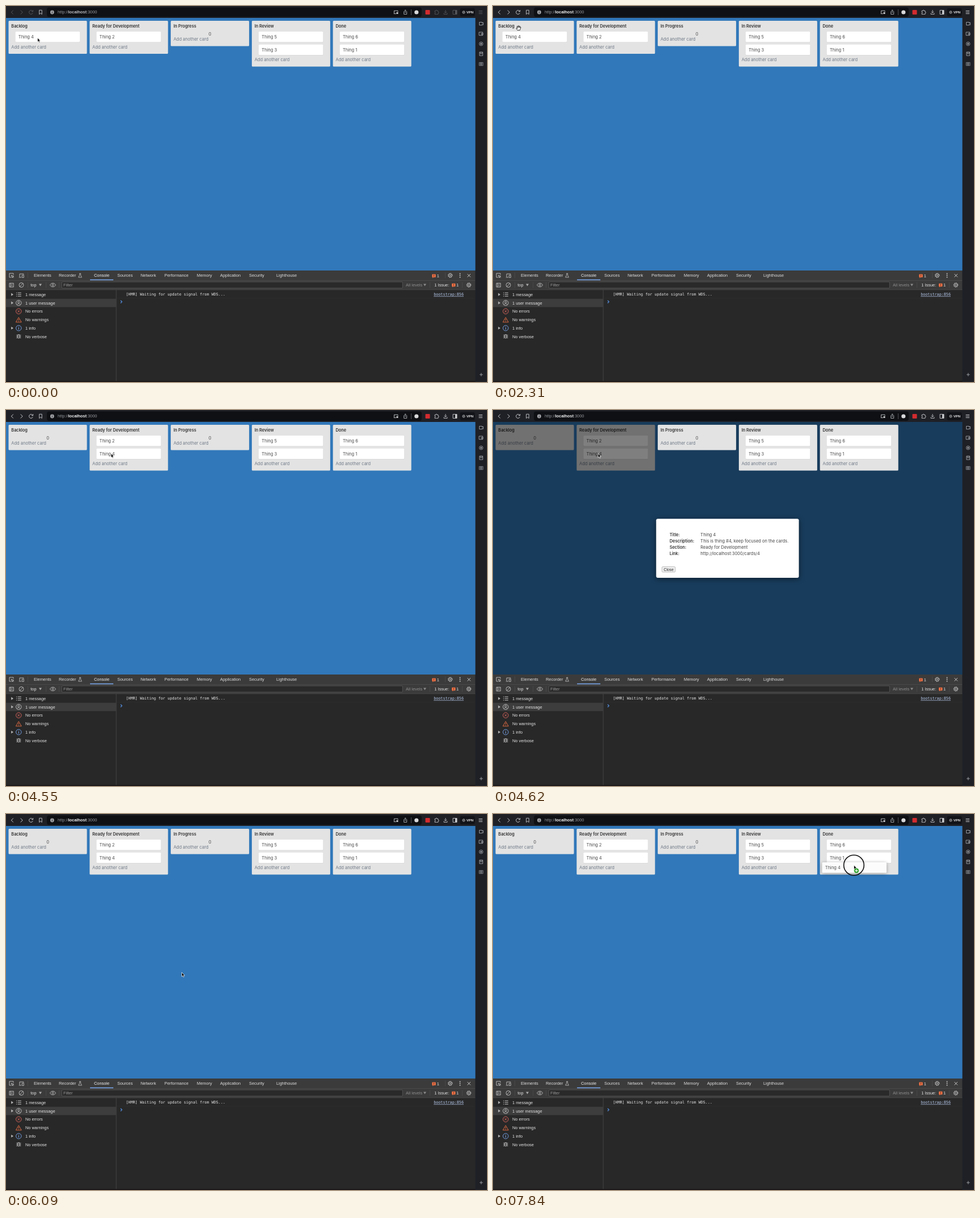
Recreate the animation shown at these times as an HTML page. Size 847 px wide and 661 px high, loop 8 s.

```html
<!DOCTYPE html>
<html lang="en">
<head>
<meta charset="utf-8">
<title>Card board</title>
<style>
html, body { margin: 0; width: 100%; height: 100%; overflow: hidden; background: #282828; }
svg { display: block; width: 847px; height: 661px; }
.ui { font: 7.4px "Liberation Sans", Arial, sans-serif; }
.tiny { font: bold 6px "Liberation Sans", Arial, sans-serif; }
.body { font: 7.5px Inter, sans-serif; }
.head { font: 600 7.35px Inter, sans-serif; }
.mono { font: 6.76px "DejaVu Sans Mono", monospace; }
.lift { filter: drop-shadow(0 1px 3px rgba(0,0,0,.35)); }
.pop { filter: drop-shadow(0 2px 5px rgba(0,0,0,.5)); }
</style>
</head>
<body>
<svg id="stage" viewBox="0 0 847 661"></svg>
<script>
const stage = document.getElementById('stage');
const LOOP = 8000, STEP = 70;

const text = (x, y, s, cls = 'ui', fill = '#e4e4e4', extra = '') =>
  `<text x="${x}" y="${y}" class="${cls}" fill="${fill}" ${extra}>${s}</text>`;
const rect = (x, y, w, h, fill, r = 0, extra = '') =>
  `<rect x="${x}" y="${y}" width="${w}" height="${h}" rx="${r}" fill="${fill}" ${extra}/>`;
const path = (d, stroke = '#c4c4c4', w = 1, fill = 'none') =>
  `<path d="${d}" stroke="${stroke}" stroke-width="${w}" fill="${fill}" stroke-linejoin="round"/>`;
const ring = (x, y, r, stroke, w = 1, fill = 'none') =>
  `<circle cx="${x}" cy="${y}" r="${r}" stroke="${stroke}" stroke-width="${w}" fill="${fill}"/>`;
const dot = (x, y, r, fill) => ring(x, y, r, 'none', 0, fill);
const at = (x, y, s) => `<g transform="translate(${x} ${y})">${s}</g>`;

// Pointer path: time, x, y
const track = [
  [0, 55.5, 56], [140, 49, 55], [280, 49, 55], [420, 37.5, 57], [490, 37.5, 57],
  [560, 54.5, 45], [770, 54.5, 45], [1120, 56, 30], [1400, 50, 16], [1470, 50, 16],
  [1610, 45, 12], [2170, 45, 12], [2310, 44.5, 38], [2660, 36, 56], [2800, 36, 56],
  [2940, 100, 52], [3080, 165, 63], [3220, 175, 68], [3570, 183.5, 73.5],
  [3990, 183.5, 73.5], [4060, 185, 74], [4130, 185, 74], [4340, 185, 76.5],
  [5040, 185, 76.5], [5390, 335, 303], [5460, 335, 303], [5880, 309.5, 278.5],
  [6160, 309.5, 278.5], [6650, 215.5, 73], [6860, 215.5, 73], [7000, 258, 75],
  [7420, 490, 83], [7840, 635.5, 90], [LOOP, 635.5, 90]
];

function pointer(t) {
  const i = track.findIndex(k => k[0] > t);
  const a = track[i - 1], b = track[i];
  const p = (t - a[0]) / (b[0] - a[0]);
  return [a[1] + (b[1] - a[1]) * p, a[2] + (b[2] - a[2]) * p];
}

const during = (t, ...spans) => spans.some(([a, b]) => t >= a && t < b);

const card = (x, y, name) =>
  rect(x, y + .6, 113.5, 18.5, '#c9c9c9', 1.5) + rect(x, y, 113.5, 18.5, '#fff', 1.5) +
  text(x + 5.3, y + 12, name, 'body', '#4a4a4a');

function column(i, title, cards, hover) {
  const x = 4.5 + 142.8 * i, n = cards.length;
  const addY = n ? 52 + 22.7 * n : 61;
  return rect(x, 26, 138, n ? 35.4 + 22.6 * n : 44.5, '#e3e3e3', 1.5) +
    text(x + 4.8, 38.3, title, 'head', '#333') +
    cards.map((c, k) => card(x + 12, 45 + 22.7 * k, 'Thing ' + c)).join('') +
    (n ? '' : text(x + 69, 52, '0', 'body', '#4a4a4a', 'text-anchor="middle"')) +
    text(x + 4.8, addY, 'Add another card', 'body', hover ? '#4d4d4d' : '#6f7a87',
      hover ? 'text-decoration="underline"' : '');
}

function modal() {
  const rows = [
    ['Title:', 'Thing 4'],
    ['Description:', 'This is thing #4, keep focused on the cards.'],
    ['Section:', 'Ready for Development'],
    ['Link:', 'http://localhost:3000/cards/4']
  ];
  return rect(287.3, 191.3, 251.3, 103.7, '#fff', 3, 'class="pop"') +
    rows.map(([k, v], i) => text(311, 221.9 + 11 * i, k, 'head', '#333') +
      text(365.3, 221.9 + 11 * i, v, 'body', '#444')).join('') +
    rect(297.5, 275.5, 23.5, 9.5, '#efefef', 1.5, 'stroke="#999" stroke-width=".6"') +
    text(309.3, 282.5, 'Close', 'ui', '#222', 'text-anchor="middle" style="font-size:6.8px"');
}

function board(t) {
  const moved = t >= 3780, open = during(t, [4620, 6090]);
  return rect(0, 21, 827, 444, '#3178ba') +
    column(0, 'Backlog', moved ? [] : [4]) +
    column(1, 'Ready for Development', moved ? [2, 4] : [2], during(t, [3430, 3920])) +
    (open ? rect(0, 21, 827, 444, 'rgba(0,0,0,.5)') : '') +
    column(2, 'In Progress', []) + column(3, 'In Review', [5, 3]) + column(4, 'Done', [6, 1]) +
    (open ? modal() : '');
}

function toolbar(t) {
  const focus = t >= 350, ink = focus ? '#c9cacd' : '#55575c', grey = '#95979c';
  const loading = during(t, [1820, 2100]);
  return rect(0, 0, 847, 21, '#1e2026') + rect(72, 2.5, 660, 16.5, '#0e1014', 4) +
    (during(t, [1540, 1890]) ? dot(44.5, 11, 9, '#34363c') : '') +
    path('M12.8 7.5L9.3 11L12.8 14.5M25.7 7.5L29.2 11L25.7 14.5', ink) +
    path(loading ? 'M41 7.7L47.5 14.2M47.5 7.7L41 14.2' : 'M47.2 12.2A3.4 3.4 0 1 1 46.6 8.8M47.6 7.2V9.7H45', ink) +
    path('M58.6 7.3H63.2V14.6L60.9 12.6L58.6 14.6Z', '#b5b7bb') +
    dot(81.3, 11, 3.4, '#a0a2a6') + path('M81.3 10.5V13M81.3 8.7V9.6', '#17191d', .9) +
    text(91, 13.4, `http://<tspan fill="${focus ? '#f2f2f2' : '#bcbec2'}" font-weight="bold">localhost</tspan>:3000`, 'ui', grey) +
    path('M683.5 13V8.3H690V10.5M682.8 13.6H687', '#c5c7ca', .9) +
    rect(687.5, 11, 3, 3, '#c5c7ca') +
    path('M701.7 9.8H700.7V14.5H705.7V9.8H704.7M703.2 12V7M701.7 8.3L703.2 6.8L704.7 8.3', '#c5c7ca', .8) +
    rect(713, 6, .8, 10, '#5f6166') + dot(722.8, 11, 3.6, '#d8d8da') +
    rect(738.5, 7, 8, 8, '#d22b2f', 1) +
    path('M755 8.5H757V7.4H759V8.5H761V10.5H762V12.5H761V14.5H755V12.6H756V10.6H755Z', ink, .8) +
    path('M774 7V12M771.8 10L774 12.2L776.2 10M771 12.5V14.4H777V12.5', ink, .9) +
    path('M787 7.5H794V14.5H787Z', ink, .9) + rect(791, 7.5, 3, 7, ink) +
    rect(799.5, 4, 26, 14, '#111318', 3) + ring(806, 11, 2.2, '#bbb', .8) +
    path('M804 11H808M806 9V13', '#bbb', .5) + text(810.8, 13.1, 'VPN', 'tiny', '#e8e8e8') +
    path('M832.5 8.5H839M832.5 11H839M832.5 13.5H839', ink, .9);
}

function sidebar() {
  const ink = '#a3a6ac';
  return rect(826.5, 21, 20.5, 640, '#1e2026') +
    path('M833.5 28.5H838.5V30L840.3 29V33.3L838.5 32.3V33.7H833.5Z', ink, .9) +
    path('M833 46H839.5V51.7H833ZM837 48.2H840V50.2H837Z', ink, .9) +
    ring(836.6, 66.5, 3.2, ink, .9) + dot(836.6, 66.5, 1.5, ink) +
    path('M833.8 81H839.5V87.3H833.8ZM835.3 81V84H838V81', ink, .9) +
    path('M833.2 99.3H836.6V104.7H833.2ZM836.6 99.3H840V104.7H836.6ZM834 101H835.8M834 102.8H835.8M837.4 101H839.2M837.4 102.8H839.2', ink, .7) +
    path('M834 648H839.6M836.8 645.2V650.8', ink, .9);
}

const gear = (x, y) => ring(x, y, 2.9, '#c4c4c4', 1) + dot(x, y, 1.1, '#c4c4c4') +
  `<circle cx="${x}" cy="${y}" r="3.8" fill="none" stroke="#c4c4c4" stroke-width="1" stroke-dasharray="1.5 1.484"/>`;
const badge = (x, y) => rect(x, y, 6.4, 5.4, '#ed7044', .8) + path(`M${x + 1} ${y + 5}V${y + 6.8}L${x + 3} ${y + 5}`, 'none', 0, '#ed7044') +
  path(`M${x + 3.2} ${y + 1}V${y + 3}M${x + 3.2} ${y + 3.6}V${y + 4.5}`, '#3a241c', .9);
const caret = (x, y, c = '#aaa') => path(`M${x} ${y}H${x + 5}L${x + 2.5} ${y + 4}Z`, 'none', 0, c);

const tabs = { Elements: 49, Recorder: 93, Console: 155, Sources: 196, Network: 237,
  Performance: 279, Memory: 336, Application: 377, Security: 428, Lighthouse: 476 };

function devtools(t) {
  const logged = !during(t, [1890, 2030]), issue = !during(t, [1890, 2100]);
  const ink = '#c4c4c4', line = '#525252';
  const rows = logged ? ['1 message', '1 user message', 'No errors', 'No warnings', '1 info', 'No verbose']
    : ['No messages', 'No user messages', 'No errors', 'No warnings', 'No info', 'No verbose'];
  const icons = [
    path('M-1.5 -3H4.5M-1.5 0H4.5M-1.5 3H4.5M-4.3 -3H-3M-4.3 0H-3M-4.3 3H-3', ink),
    ring(0, 0, 4.7, ink, .9) + ring(0, -1.3, 1.6, ink, .9) + path('M-3 3.5C-2 .8 2 .8 3 3.5', ink, .9),
    ring(0, 0, 4.7, '#e46962', .9) + path('M-1.8 -1.8L1.8 1.8M1.8 -1.8L-1.8 1.8', '#e46962', .9),
    path('M0 -4L4.9 4.3H-4.9ZM0 -1.2V1.6M0 2.3V3.2', '#ed7044', .9),
    ring(0, 0, 4.7, '#7cacf8', .9) + path('M0 -.8V2.6M0 -2.6V-1.6', '#7cacf8', 1),
    `<ellipse rx="2.2" ry="3" fill="none" stroke="${ink}"/>` + path('M-4 -2.5H-2M2 -2.5H4M-4.3 0H4.3M-4 2.5H-2M2 2.5H4M-1.5 -4L-.6 -2.8M1.5 -4L.6 -2.8', ink, .8)
  ];
  return rect(0, 465, 826.5, 196, '#282828') + rect(0, 465, 826.5, 34, '#3b3b3b') +
    rect(0, 482, 826.5, .6, line) + rect(0, 498.6, 826.5, .6, line) +
    path('M9 477H6V470H13V472.5', ink, .9) + path('M9.3 473.2L13.8 475.2L11.9 476L13.5 477.8M9.3 473.2L10.9 477.8L11.9 476', ink, .9) +
    path('M24 476V471H31V472.3M22.8 477H27M28.3 473.2H31.3V477.3H28.3Z', ink, .9) +
    rect(38, 468.5, .6, 10, line) +
    Object.entries(tabs).map(([s, x]) => text(x, 476.1, s, 'ui', s === 'Console' ? '#f4f4f4' : '#dedede')).join('') +
    path('M129 470.3H132M129.6 470.3V473L127.6 477H133.4L131.4 473V470.3', ink, .8) +
    rect(148, 480.7, 41, 1.4, '#7cacf8') +
    (issue ? badge(750.3, 471.6) + text(758.8, 477, '1') : '') +
    rect(773, 468.5, .6, 10, line) + gear(782.2, 473.6) +
    [470.5, 473.6, 476.7].map(y => dot(799.5, y, 1, ink)).join('') +
    path('M812.5 471L818 476.5M818 471L812.5 476.5', ink) +
    path('M6 487.3H13.3V494H6ZM8.2 487.3V494M11.7 489L9.8 490.6L11.7 492.3', ink, .9) +
    ring(27, 490.5, 4, ink, .9) + path('M24.2 493.3L29.8 487.7', ink, .9) +
    rect(38, 485.5, .6, 10, line) + text(43.3, 493, 'top') + caret(58, 488.6) + rect(70, 485.5, .6, 10, line) +
    path('M77.5 490.5C79.5 486.2 85.5 486.2 87.5 490.5C85.5 494.8 79.5 494.8 77.5 490.5Z', ink, .9) + ring(82.5, 490.5, 1.5, ink, .9) +
    rect(93, 485.5, .6, 10, line) +
    rect(98.3, 485, 600, 11, '#2a2a2a', 1, 'stroke="#696969" stroke-width=".6"') +
    text(101, 493, 'Filter', 'ui', '#989898') +
    text(704, 493, 'All levels', 'ui', '#8c8c8c') + caret(735, 488.4, '#8c8c8c') + rect(746, 485.5, .6, 10, line) +
    (issue ? text(754.3, 493, '1 Issue:') + badge(785, 487.8) + text(793, 493, '1') : text(754.3, 493, 'No Issues')) +
    rect(803, 485.5, .6, 10, line) + gear(815, 490.5) +
    rect(0, 514.7, 193.7, 14.6, '#3d3d3d') + rect(193.7, 499, .7, 162, '#505050') +
    rows.map((s, i) => {
      const y = 507.2 + 14.76 * i;
      return (s[0] === '1' ? path(`M9.2 ${y - 2.6}V${y + 2.6}L13 ${y}Z`, 'none', 0, '#b5b5b5') : '') +
        at(22.3, y, icons[i]) + text(34, y + 2.6, s);
    }).join('') +
    (logged ? text(211.3, 509.4, '[HMR] Waiting for update signal from WDS...', 'mono') +
      text(806, 509.4, 'bootstrap:856', 'mono', '#b9cdf0', 'text-anchor="end" text-decoration="underline"') +
      rect(194.4, 513.6, 632, .5, '#333') : '') +
    at(203, logged ? 520 : 507, path('M-1.2 -2.3L1.2 0L-1.2 2.3', '#5c9cf5', 1.1)) +
    rect(0, 659.3, 847, 1.7, '#191517');
}

function cursor(t) {
  const [x, y] = pointer(t);
  const early = during(t, [2870, 3780]), drag = early || t >= 6930;
  const pressed = during(t, [2800, 3780], [4480, 4550], [6020, 6090], [6790, LOOP]);
  const hand = !drag && y > 26 && during(t, [420, 2870], [6580, 6930]);
  const ghost = early ? [x - 19.3, y - 11] : [x - 56, y - 5];
  return (drag ? `<g class="lift" opacity=".92">${rect(...ghost, 113.5, 18.5, '#fff', 1.5)}` +
      `${text(ghost[0] + 5.3, ghost[1] + 12, 'Thing 4', 'body', '#4a4a4a')}</g>` : '') +
    (pressed ? ring(x, y, 17.8, '#111', 1.6) : '') +
    at(x, y, hand
      ? path('M-1.5 4.6L-3.4 1.8C-4 .8 -2.9 .2 -2.2 1L-1.5 1.8L-2.4 -1.6C-2.5 -2.7 -1.3 -2.8 -1 -1.9L-.5 -.3L-.4 -2.8C-.3 -3.8 .9 -3.7 1 -2.8L1.2 -.4L1.8 -2.3C2.2 -3.2 3.2 -2.8 3 -1.9L2.7 .3L3.4 -.8C4 -1.4 4.7 -.9 4.4 -.1L3.3 3L2.9 4.6Z', '#111', .8, '#fff')
      : path('M0 0V7.2L1.7 5.7L2.8 8.3L4.1 7.7L3 5.2H5.2Z', '#fff', .7, '#000')) +
    (drag ? ring(x + 4.5, y + 9.6, 4.4, '#fff', .3, '#2fa02c') +
      path(`M${x + 2} ${y + 9.6}h5m-2.5 -2.5v5`, '#fff', 1.1) : '');
}

let shown = -1;
function tick(now) {
  const t = Math.floor(now % LOOP / STEP) * STEP;
  if (t !== shown) {
    shown = t;
    stage.innerHTML = board(t) + toolbar(t) + devtools(t) + sidebar() + cursor(t);
  }
  requestAnimationFrame(tick);
}
tick(performance.now());
</script>
</body>
</html>
```
